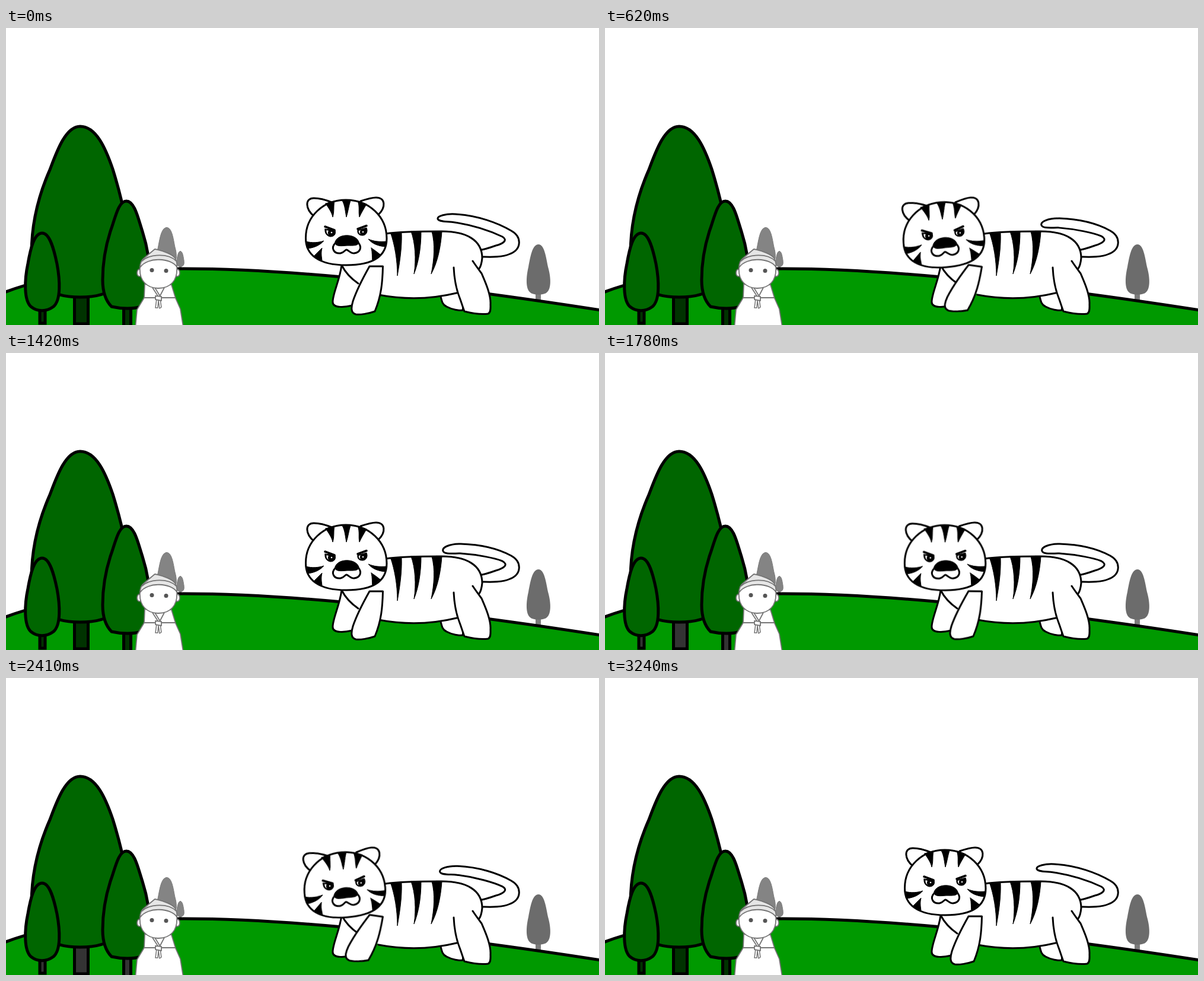
An HTML page for the animation above (3270 ms loop, 1000 px wide and 501 px high).

```html
<!DOCTYPE html>
<html lang="en">
<head>
<meta charset="utf-8">
<title>Tiger on the hill</title>
<style>
html, body { margin: 0; width: 100%; height: 100%; overflow: hidden; background: #fff; }
svg { display: block; width: 100%; height: 100%; }

.tree { fill: #060; stroke: #000; stroke-width: 5; }
.trunk { fill: #030; stroke: #000; stroke-width: 5; animation: bark 3270ms step-end infinite; }
.tiger { fill: #fff; stroke: #000; stroke-width: 3; stroke-linecap: round; stroke-linejoin: round; }
.ink { fill: #000; stroke-width: 1; }
.line { fill: none; }
.person { fill: #fff; stroke: #747474; stroke-width: 1.8; stroke-linejoin: round; }

.head, .paw, .tail { animation: 3270ms linear infinite; }
.head { transform-origin: 620px 385px; animation-name: nod; }
.paw { transform-origin: 630px 402px; animation-name: step; }
.tail { animation-name: wag; }

@keyframes nod {
  0%, 42.8%, 52.6%, 98.5%, 100% { transform: rotate(0deg); }
  19.5%, 24.5%, 73.4%, 84.1% { transform: rotate(-4.6deg); }
}
@keyframes step {
  0%, 42.8%, 52.6%, 98.5%, 100% { transform: rotate(0deg); }
  19.5%, 24.5%, 73.4%, 84.1% { transform: rotate(8.3deg); }
}
@keyframes wag {
  0%, 83.8%, 100% {
    d: path("M800 386 C812 386 835 388 850 381 C870 373 870 352 852 342 C830 329 795 316 758 314 C742 313 727 317 728 322 C730 327 742 326 757 328 C790 333 820 344 837 352 C847 358 838 364 826 367 C815 371 805 374 797 375");
  }
  21.4%, 59.6% {
    d: path("M800 386 C812 386 835 388 850 381 C870 373 870 352 852 342 C830 330 801 323 767 322 C747 322 735 328 737 334 C739 340 753 338 766 338 C795 340 825 346 837 351 C848 357 840 363 826 367 C815 371 805 374 797 375");
  }
}
@keyframes bark {
  0%, 93% { fill: #030; }
  50% { fill: #333; }
}
</style>
</head>
<body>
<svg viewBox="0 0 1000 501" preserveAspectRatio="none">
  <!-- far trees -->
  <g fill="#6c6c6c">
    <path d="M893 440H902V460H893Z" fill="#7a7a7a"/>
    <path d="M898 365C887 365 884 388 881 403C877 420 876 440 884 446C889 451 907 451 912 446C920 440 919 420 914 403C911 388 908 365 898 365Z"/>
  </g>
  <g fill="#848484" stroke="#7a7a7a" stroke-width="1">
    <path d="M267 390H275V408H267Z"/>
    <path d="M271 336.500C261 337 259 359 256 372C253 386 254 396 260 399C266 401 277 401 282 398C289 393 288 380 285 370C282 355 280 337 271 336.500Z"/>
    <path d="M292.500 398H295.500V407H292.500Z"/>
    <path d="M294 376.500C290 377 289 386 288 392C287 400 289 402 294 402.500C299 402 301 400 300 392C299 386 298 377 294 376.500Z"/>
  </g>

  <path d="M-10 449C90 408 200 406 300 406C500 406 760 438 1010 477V510H-10Z" fill="#090" stroke="#000" stroke-width="5"/>

  <!-- near trees -->
  <path class="trunk" d="M115.500 450H138.500V499H115.500Z"/>
  <path class="tree" d="M125 166C100 166 85 210 74 239C55 282 43 330 43 380C43 430 70 454 125 454C180 454 207 430 207 380C207 335 193 280 180 238C168 203 152 166 125 166Z"/>
  <path class="trunk" d="M57 470H66V498H57Z"/>
  <path class="tree" d="M61 346C47 346 41 374 37 397C31 425 30 459 42 470C53 479 68 479 80 470C93 459 91 425 86 398C81 374 74 346 61 346Z"/>
  <path class="trunk" d="M198.500 468H210.500V505H198.500Z"/>
  <path class="tree" d="M203 292C189 292 184 322 176 343C168 368 163 398 163 425C163 445 168 460 178 470C195 474 215 474 228 470C238 460 243 445 243 425C243 398 238 368 230 343C223 322 217 292 203 292Z"/>

  <!-- villager -->
  <g class="person">
    <path d="M234 432L233 455L221 475L218.500 502H298.500L294 474L286 456L279 433Z"/>
    <path class="line" d="M232 455H286M247 438L258 455L267 438M251 438L259 451"/>
    <path d="M254 457L252 472L256 472L257 460L259 473L262 471L260 457Z" stroke-width="1.500"/>
    <path d="M252 452L262 453L262 460L252 458Z"/>
    <ellipse cx="225" cy="413" rx="4" ry="6"/>
    <ellipse cx="289" cy="413" rx="4" ry="6"/>
    <path d="M226 404C224 426 238 439 257 439C277 439 290 426 288 402C281 381 235 380 226 404Z"/>
    <path d="M226 404C226 396 229 391 233 388L251 373C266 376 281 382 285 388C288 393 289 398 288 403C279 388 239 385 226 404Z" fill="#e6e6e6"/>
    <path class="line" d="M228 394C243 380 274 380 287 393"/>
    <g fill="#555" stroke="none">
      <circle cx="246" cy="408.500" r="3.500"/>
      <circle cx="270" cy="409.500" r="3.500"/>
    </g>
  </g>

  <!-- tiger -->
  <g class="tiger">
    <path class="tail" d="M800 386 C812 386 835 388 850 381 C870 373 870 352 852 342 C830 329 795 316 758 314 C742 313 727 317 728 322 C730 327 742 326 757 328 C790 333 820 344 837 352 C847 358 838 364 826 367 C815 371 805 374 797 375"/>
    <path d="M733 453C735 461 736 467 743 470C752 475 764 477 770 476C773 465 766 452 760 443"/>
    <path d="M566 400C563 425 550 450 551 463C552 473 572 471 584 468L610 430"/>
    <path d="M640 347C660 344 700 343 735 343C775 343 803 357 803 388C802 399 800 403 797 407L780 440L740 452C700 458 660 456 630 450L594 431C581 422 572 412 566 400Z" stroke="none"/>
    <path class="line" d="M640 347C660 344 700 343 735 343C775 343 803 357 803 388C802 399 800 403 798 406M760 447C715 458 670 458 628 450M594 431C581 422 572 412 566 400"/>
    <path d="M787 393C793 402 799 410 802 414C808 428 818 450 817 466C817 472 818 480 813 482C800 484 785 481 773 478C770 470 768 463 765 455C759 440 756 425 755 404"/>
    <g class="ink">
      <path d="M649 347L667 345C668 370 664 395 660 418C660 390 655 365 649 347Z"/>
      <path d="M683 343H700C700 370 696 395 688 415C692 390 690 362 683 343Z"/>
      <path d="M718 343L735 344C733 370 728 395 717 415C722 390 724 365 718 343Z"/>
    </g>
    <path class="paw" d="M613 402H635.500C635 428 633 452 622 478C611 482 597 484 590 483C581 481 582 471 585 461C592 440 604 418 613 402Z"/>

    <g class="head">
      <path d="M520 318C504 305 504 287 519 287C530 287 542 291 549 294"/>
      <path d="M598 292C610 288 618 286 624 286C640 286 641 302 628 315"/>
      <path d="M573 290C612 290 642 318 642 355C642 385 620 400 574 400C528 400 505 383 505.500 354C505.500 318 535 290 573 290Z"/>
      <g class="ink">
        <path d="M539 296L554 292C552 300 554 310 551 319C549 310 544 304 539 296Z"/>
        <path d="M567 291H581C578 300 577 310 574 319C572 310 572 300 567 291Z"/>
        <path d="M593 292L608 297C603 306 599 312 596 319C594 310 597 301 593 292Z"/>
        <path d="M506 360C516 363 527 362 536 359C529 367 519 371 508 372Z"/>
        <path d="M641 360C630 361 620 360 611 356C617 364 628 368 640 369Z"/>
        <path d="M519 385L533 371C531 379 532 385 533 392C528 390 523 388 519 385Z"/>
        <path d="M616 371C622 375 626 378 631 382L618 393C617 386 618 379 616 371Z"/>
      </g>
      <path class="line" d="M556 362C546 372 554 381 564 380C570 379 572 374 574 374C577 374 580 380 587 380C597 379 601 370 594 362"/>
      <path class="ink" d="M555 361C559 346 590 346 595 361C595 368 585 367 575 367C565 368 554 369 555 361Z"/>
      <path class="line" d="M538 335L554 341M593 339L608 333.500" stroke-width="3.500"/>
      <g class="ink">
        <path d="M538 339L555 341C557 348 553 352 547 352C541 351 537 346 538 339Z"/>
        <path d="M593 341L608 337C611 344 607 350 601 350C595 350 592 346 593 341Z"/>
      </g>
      <g stroke="none">
        <path d="M540.500 341L544 342C542 345 543 347 544 349C541 347 540 344 540.500 341Z"/>
        <circle cx="549" cy="345" r="1.300"/>
        <path d="M595 342L598 341C596 344 597 346 598 348C595 346 594.500 344 595 342Z"/>
        <circle cx="602" cy="344" r="1.300"/>
      </g>
    </g>
  </g>
</svg>
</body>
</html>
```
